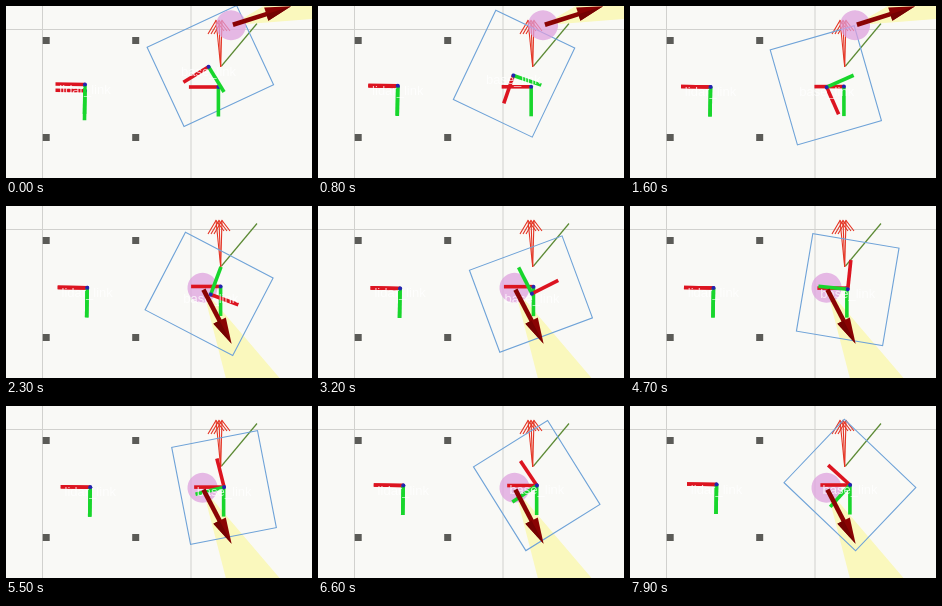
An HTML page with a canvas that plays this animation: 306 px wide and 172 px high, repeating every 8 s.

```html
<!DOCTYPE html>
<html lang="en">
<head>
<meta charset="utf-8">
<title>Turning robot</title>
<style>
html, body { margin: 0; width: 100%; height: 100%; overflow: hidden; background: #f9f9f6; }
canvas { display: block; width: 306px; height: 172px; }
</style>
</head>
<body>
<canvas id="stage"></canvas>
<script>
const LOOP = 8, STEP = 0.1, GOAL_JUMP = 1.8, LEAD = 0.13;
const RAD = Math.PI / 180;
const RED = '#dc1420', GREEN = '#18d62c', BLUE = '#2424b0';
const ARROW = '#8a0303', ARROW_SHADE = '#740202', FAN = '#e43424';

const canvas = document.getElementById('stage');
const ctx = canvas.getContext('2d');
const ratio = window.devicePixelRatio || 1;
canvas.width = 306 * ratio;
canvas.height = 172 * ratio;

// Heading of the robot: [seconds, degrees], joined by a smooth curve.
const heading = [[0, 155], [1.6, 74], [2.3, 27.5], [4, -57], [5.5, -101], [6.6, -122], [8, -137.5]];

function slope(i) {
  const a = heading[Math.max(0, i - 1)];
  const b = heading[Math.min(heading.length - 1, i + 1)];
  return (b[1] - a[1]) / (b[0] - a[0]);
}

function turnAt(t) {
  let i = 0;
  while (i < heading.length - 2 && t > heading[i + 1][0]) i++;
  const [t0, a] = heading[i], [t1, b] = heading[i + 1];
  const span = t1 - t0, u = (t - t0) / span, v = 1 - u;
  return a + (b - a) * u * u * (3 - 2 * u)
    + span * u * v * (slope(i) * v - slope(i + 1) * u);
}

// Both fixed frames drift right and sway a little.
const leftFrame = t => ({
  x: 79 + 0.95 * t,
  y: 78.5 + 4 * Math.max(0, Math.sin(Math.PI * t / 7.2)),
  turn: Math.PI + RAD
});

const rightFrame = t => ({
  x: 212.4 + 0.95 * t,
  y: 81 - 0.25 * t + 2.3 * Math.exp(-(((t - 4.7) / 1.2) ** 2)),
  turn: Math.PI
});

// The robot spirals in on the right frame as it turns.
function robot(t) {
  const home = rightFrame(t), turn = turnAt(t);
  const r = 22.5 * Math.exp(-0.073 * t ** 2.3);
  const way = (125 + 0.8 * turn) * RAD;
  return { x: home.x + r * Math.cos(way), y: home.y + r * Math.sin(way), turn: turn * RAD };
}

const goalAt = t => t < GOAL_JUMP
  ? { x: 225, y: 19.3, turn: -17.5 * RAD }
  : { x: 196.5, y: 81.8, turn: 62.5 * RAD };

function line(points, color, width) {
  ctx.beginPath();
  points.forEach(p => ctx.lineTo(...p));
  ctx.strokeStyle = color;
  ctx.lineWidth = width;
  ctx.stroke();
}

function fill(points, color) {
  ctx.beginPath();
  points.forEach(p => ctx.lineTo(...p));
  ctx.fillStyle = color;
  ctx.fill();
}

function dot(r, color) {
  ctx.beginPath();
  ctx.arc(0, 0, r, 0, 7);
  ctx.fillStyle = color;
  ctx.fill();
}

function at(p, paint) {
  ctx.save();
  ctx.translate(p.x, p.y);
  ctx.rotate(p.turn);
  paint();
  ctx.restore();
}

function axes(p) {
  at(p, () => {
    line([[0, 0], [29.5, 0]], RED, 3.6);
    line([[0, 0], [0, -29.5]], GREEN, 3.6);
    dot(2, BLUE);
  });
}

function label(text, p) {
  ctx.fillStyle = 'rgba(255, 255, 255, .75)';
  ctx.fillText(text, p.x, p.y + 9);
}

function room() {
  ctx.fillStyle = '#f9f9f6';
  ctx.fillRect(0, 0, 306, 172);
  ctx.fillStyle = '#d1d1ce';
  for (const x of [36, 184.5]) ctx.fillRect(x, 0, 1, 172);
  ctx.fillRect(0, 23, 306, 1);
  ctx.fillStyle = '#5b5b57';
  for (const x of [36.7, 126.2]) for (const y of [31, 128]) ctx.fillRect(x, y, 7, 7);
}

function fan() {
  line([[215.5, 60], [251, 17.5]], '#5c8a34', 1.2);
  for (const x of [210, 213, 216]) {
    line([[214.7, 61], [x, 14.5]], FAN, 1.1);
    line([[x - 8, 28], [x, 14.5], [x + 8, 25]], FAN, 1.1);
  }
}

function cone() {
  const spread = Math.tan(13 * RAD) * 180;
  fill([[0, 0], [180, -spread], [180, spread]], '#faf8bd');
}

function arrow() {
  fill([[2, -2.3], [38, -2.3], [38, 2.3], [2, 2.3]], ARROW);
  fill([[37, -7], [63, 0], [37, 7]], ARROW);
  fill([[37, 0], [63, 0], [37, 7]], ARROW_SHADE);
}

function outline() {
  ctx.strokeStyle = '#6fa3d8';
  ctx.lineWidth = 1.1;
  ctx.strokeRect(-49.4, -43.7, 98.8, 87.4);
}

function draw(t) {
  ctx.setTransform(ratio, 0, 0, ratio, 0, 0);
  ctx.font = '13px "Liberation Sans", Arial, sans-serif';
  ctx.textAlign = 'center';
  const goal = goalAt(t), base = robot(t + LEAD), world = leftFrame(t);
  const gap = Math.max(0, 6.2 * (1 - t / 0.9));

  room();
  fan();
  at(goal, cone);
  at(robot(t), outline);
  at(goal, () => dot(15, 'rgba(222, 160, 222, .72)'));
  // A second left frame closes up with the first one.
  for (const p of [{ ...world, y: world.y + gap }, world, rightFrame(t), base]) axes(p);
  label('lidar_link', world);
  label('base_link', base);
  at(goal, arrow);
}

function tick(now) {
  const t = (now / 1000) % LOOP;
  draw(Math.floor(t / STEP + 1e-6) * STEP);
  requestAnimationFrame(tick);
}
draw(0);
requestAnimationFrame(tick);
</script>
</body>
</html>
```
